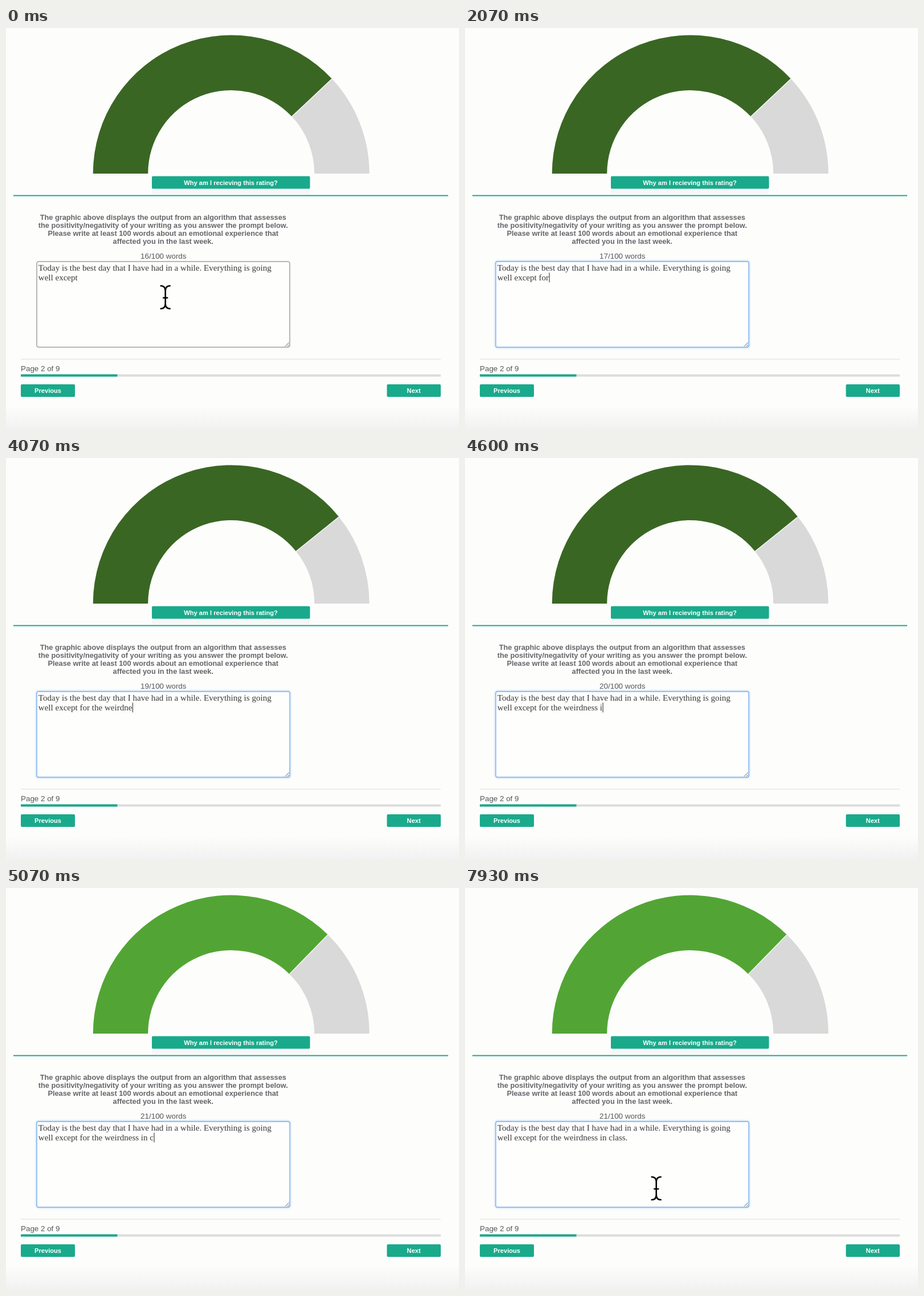
Animation, 795 px wide and 704 px high, one loop 8000 ms. Source, as an HTML page:

```html
<!DOCTYPE html>
<html lang="en">
<head>
<meta charset="utf-8">
<title>Writing gauge</title>
<style>
  html, body { margin: 0; width: 100%; height: 100%; overflow: hidden; background: #fdfdfc; }
  svg { display: block; width: 795px; height: 704px; font-family: "Liberation Sans", Arial, sans-serif; }
  text { white-space: pre; }
  .middle { text-anchor: middle; }
  .prompt { font-size: 12.75px; font-weight: bold; fill: #66666b; }
  .label { font-size: 13.4px; fill: #57575a; }
  .button { font-size: 11.15px; font-weight: bold; fill: #fff; }
  .entry { font: 15.06px "Liberation Serif", Times, serif; fill: #3a3a3c; }
  .teal { fill: #19aa8b; }
</style>
</head>
<body>
<svg viewBox="0 0 795 704">
  <defs>
    <linearGradient id="shade" x2="0" y2="1">
      <stop offset="0" stop-color="#fdfdfc"/>
      <stop offset="1" stop-color="#f1f1f1"/>
    </linearGradient>
    <filter id="glow" x="-5%" y="-10%" width="110%" height="120%"><feGaussianBlur stdDeviation="1.5"/></filter>
  </defs>
  <rect width="795" height="704" fill="#fdfdfc"/>
  <rect y="662" width="795" height="42" fill="url(#shade)"/>

  <path id="rest" fill="#d9d9d9"/>
  <path id="score"/>
  <path id="split" stroke="#fff" stroke-width="1.2"/>

  <rect x="256" y="281" width="277" height="10" fill="#f7f7f7"/>
  <rect class="teal" x="256" y="259.5" width="277.5" height="22" rx="2"/>
  <text class="button middle" x="394.5" y="275">Why am I recieving this rating?</text>
  <rect class="teal" x="13" y="292.5" width="763" height="2"/>

  <g class="prompt middle">
    <text x="275.8" y="336">The graphic above displays the output from an algorithm that assesses</text>
    <text x="275.8" y="350">the positivity/negativity of your writing as you answer the prompt below.</text>
    <text x="275.8" y="364">Please write at least 100 words about an emotional experience that</text>
    <text x="275.8" y="378.3">affected you in the last week.</text>
  </g>
  <text id="count" class="label middle" x="276.3" y="404"></text>

  <rect id="halo" x="54" y="409" width="444" height="150" rx="3" fill="none" stroke="#c2dcf8" stroke-width="3.5" filter="url(#glow)"/>
  <rect id="box" x="54" y="409" width="444" height="150" rx="3" fill="#fefefd"/>
  <path d="M490 557.5l6.5-6.5M494 557.5l2.5-2.5" stroke="#555" fill="none"/>
  <text class="entry" x="56.8" y="425">Today is the best day that I have had in a while. Everything is going</text>
  <text id="line" class="entry" x="56.8" y="442"></text>
  <rect id="caret" y="428.5" width="1" height="17" fill="#222"/>

  <rect x="26" y="579.5" width="737" height="1" fill="#dedede"/>
  <text class="label" x="26" y="601">Page 2 of 9</text>
  <rect x="26" y="606.5" width="737" height="4" fill="#dcdcdc"/>
  <rect class="teal" x="26" y="606.5" width="169.5" height="4"/>
  <rect class="teal" x="26" y="624" width="95" height="22" rx="2"/>
  <text class="button middle" x="73.5" y="639">Previous</text>
  <rect class="teal" x="668.5" y="624" width="94.5" height="22" rx="2"/>
  <text class="button middle" x="715.7" y="639">Next</text>

  <g id="pointer" fill="none" stroke="#000" stroke-width="2.6" stroke-linecap="round">
    <path d="M-8-20Q0-20 0-11V11Q0 20-8 20M8-20Q0-20 0-11M0 11Q0 20 8 20M-3.5 1H3.5"/>
  </g>
</svg>
<script>
const LOOP = 8000, FOCUS = 900, FIRST_KEY = 1400, LAST_KEY = 6100;
const firstLine = 'Today is the best day that I have had in a while. Everything is going ';
const shown = 'well except', typed = ' for the weirdness in class.';
// [time in ms, characters typed so far]
const keys = [[FIRST_KEY, 0], [2000, 4], [3260, 11], [4540, 20], [5010, 23], [5600, 27], [LAST_KEY, 28]];
// [start in ms, degrees left grey, colour]
const ratings = [[0, 43.2, '#3a6623'], [2650, 38.8, '#3a6623'], [4850, 45.6, '#52a534']];
const el = id => document.getElementById(id);
const [rest, score, split, count, halo, box, line, caret, pointer] =
  ['rest', 'score', 'split', 'count', 'halo', 'box', 'line', 'caret', 'pointer'].map(el);

const show = (node, on) => node.setAttribute('visibility', on ? 'visible' : 'hidden');

function polar(radius, degrees) {
  const a = degrees * Math.PI / 180;
  return `${395.2 + radius * Math.cos(a)} ${255 - radius * Math.sin(a)}`;
}

function ring(from, to) {
  return `M${polar(242.5, from)}A242.5 242.5 0 0 1 ${polar(242.5, to)}` +
    `L${polar(146, to)}A146 146 0 0 0 ${polar(146, from)}Z`;
}

function charsAt(t) {
  if (t <= FIRST_KEY) return 0;
  if (t >= LAST_KEY) return typed.length;
  const i = keys.findIndex(([time]) => time > t);
  const [t0, n0] = keys[i - 1], [t1, n1] = keys[i];
  return Math.floor(n0 + (n1 - n0) * (t - t0) / (t1 - t0));
}

function drawGauge(t) {
  const [, angle, colour] = ratings.filter(([start]) => start <= t).pop();
  score.setAttribute('d', ring(180, angle));
  score.setAttribute('fill', colour);
  rest.setAttribute('d', ring(angle, 0));
  split.setAttribute('d', `M${polar(146, angle)}L${polar(242.5, angle)}`);
}

function drawEntry(t) {
  const text = shown + typed.slice(0, charsAt(t));
  const focused = t >= FOCUS;
  const typing = t >= FIRST_KEY && t < LAST_KEY;
  const idle = t - (t < FIRST_KEY ? FOCUS : LAST_KEY);
  line.textContent = text;
  count.textContent = `${(firstLine + text).split(' ').length - 1}/100 words`;
  box.setAttribute('stroke', focused ? '#7cb0ec' : '#727274');
  box.setAttribute('stroke-width', focused ? 1.4 : 1);
  show(halo, focused);
  show(caret, focused && (typing || idle % 1000 < 500));
  caret.setAttribute('x', 57.3 + line.getComputedTextLength());
}

function drawPointer(t) {
  const p = Math.min(1, Math.max(0, (t - 7000) / 650));
  const ease = p * p * (3 - 2 * p);
  pointer.setAttribute('transform', `translate(${279.7 + 56 * ease} ${471.5 + 54.5 * ease})`);
  show(pointer, t < FIRST_KEY || t >= 7000);
}

function frame() {
  const t = performance.now() % LOOP;
  drawGauge(t);
  drawEntry(t);
  drawPointer(t);
  requestAnimationFrame(frame);
}
frame();
</script>
</body>
</html>
```
